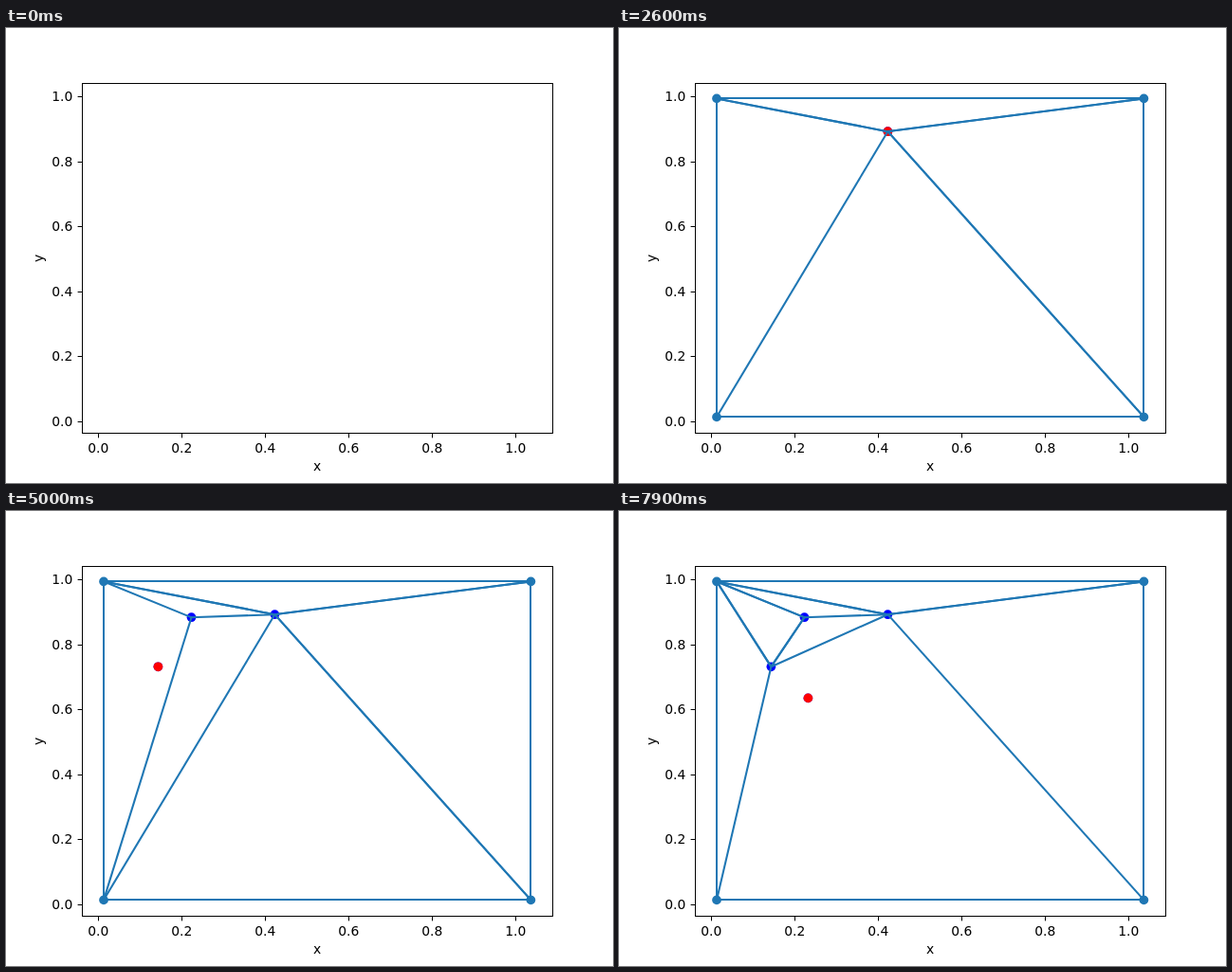
An HTML page for the animation above (8000 ms loop, 640 by 480 pixels).

```html
<!DOCTYPE html>
<html lang="en">
<head>
<meta charset="utf-8">
<title>Incremental triangulation</title>
<style>
  html, body { margin: 0; width: 100%; height: 100%; overflow: hidden; background: #fff; }
  svg { display: block; }
  text { font: 13.89px "DejaVu Sans", sans-serif; fill: #000; }
  .axis { stroke: #000; fill: none; stroke-width: 1; }
  .edge { stroke: #1f77b4; stroke-width: 2.08; stroke-linecap: square; fill: none; }
  .hull { stroke: #1f77b4; stroke-width: 2; fill: none; }
</style>
</head>
<body>
<svg width="640" height="480" viewBox="0 0 640 480">
  <g id="dots"></g>
  <g id="edges"></g>
  <g id="corners"><rect class="hull" x="103" y="74" width="450" height="336"/></g>
  <g id="axes">
    <rect class="axis" x="80.5" y="58.5" width="496" height="369"/>
    <text x="328" y="467" text-anchor="middle">x</text>
    <text transform="translate(39 243) rotate(-90)" text-anchor="middle">y</text>
  </g>
</svg>
<script>
const STEP = 100, STEPS = 80, RADIUS = 4.86;
const points = {
  A: [103, 74.4], B: [553.4, 74.4], C: [103, 410.4], D: [553.4, 410.4],
  P: [283.4, 109.2], Q: [195.5, 112.2], R: [160.4, 164.3], S: [199.4, 197.4]
};
const hullEdges = ["AB", "AC", "BD", "CD"];
const group = id => document.getElementById(id);

function make(parent, tag, attrs, text = "") {
  const el = document.createElementNS("http://www.w3.org/2000/svg", tag);
  for (const name in attrs) el.setAttribute(name, attrs[name]);
  el.textContent = text;
  return parent.appendChild(el);
}

function drawDot(parent, name, fill) {
  const [cx, cy] = points[name];
  return make(parent, "circle", { cx, cy, r: RADIUS, fill });
}

// Axes
for (let i = 0; i < 6; i++) {
  const x = 97 + 88 * i, y = Math.round(415 - 68.6 * i), label = (i / 5).toFixed(1);
  make(group("axes"), "path", { class: "axis", d: `M${x + .5} 428v4.4M80 ${y + .5}h-4.4` });
  make(group("axes"), "text", { x: x + .3, y: 448, "text-anchor": "middle" }, label);
  make(group("axes"), "text", { x: 70.3, y: y + 5.4, "text-anchor": "end" }, label);
}
for (const name of "ABCD") drawDot(group("corners"), name, "#1f77b4");

// Timeline: every item is visible from its start step until its end step
const items = [];
let step = 1;

function show(el, key) {
  const item = { el, key, start: step++, end: Infinity };
  items.push(item);
  return item;
}

const sides = tri => [0, 1, 2].map(i => [tri[i], tri[(i + 1) % 3]].sort().join(""));

// Hull sides are always drawn, so they only take up a step
function addTriangle(tri) {
  for (const key of sides(tri)) {
    if (hullEdges.includes(key)) { step++; continue; }
    const [[x1, y1], [x2, y2]] = [points[key[0]], points[key[1]]];
    show(make(group("edges"), "line", { class: "edge", x1, y1, x2, y2 }), key);
  }
}

function removeTriangle(tri) {
  for (const key of sides(tri)) {
    const item = items.find(it => it.key === key && it.end === Infinity);
    if (item) item.end = step;
    step++;
  }
}

function insertPoint(name, bad, fresh) {
  show(drawDot(group("dots"), name, "#00f"));
  const active = show(drawDot(group("dots"), name, "#f00"));
  bad.forEach(removeTriangle);
  fresh.forEach(addTriangle);
  active.end = step++;
}

show(group("corners"));
["BCD", "BAC"].forEach(addTriangle);
insertPoint("P", ["BAC", "BCD"], ["ACP", "BAP", "DBP", "CDP"]);
insertPoint("Q", ["ACP"], ["PAQ", "CPQ", "ACQ"]);
insertPoint("R", ["ACQ", "CPQ", "CDP"], ["QAR", "PQR", "DPR", "CDR", "ACR"]);
insertPoint("S", ["CDR", "DPR", "PQR"], []);

let shown = -1;
const origin = performance.now();

function render() {
  const now = Math.floor((performance.now() - origin) / STEP) % STEPS;
  if (now !== shown) {
    shown = now;
    for (const { el, start, end } of items)
      el.style.display = now >= start && now < end ? "" : "none";
  }
  requestAnimationFrame(render);
}
render();
</script>
</body>
</html>
```
